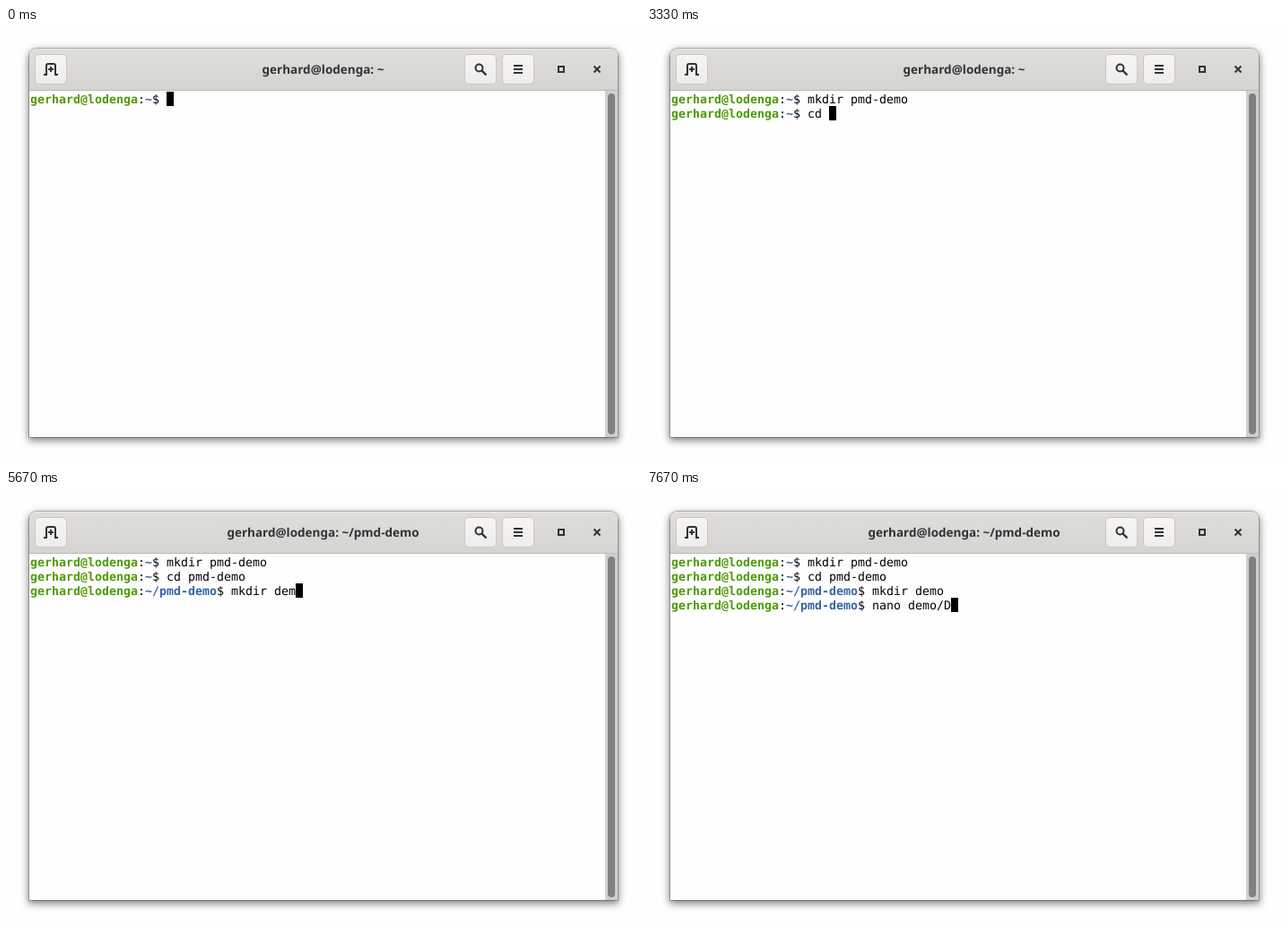
Recreate the animation shown at these times as an HTML page. Size 708x485 px, loop 8000 ms.

```html
<!DOCTYPE html>
<html lang="en">
<head>
<meta charset="utf-8">
<title>Terminal</title>
<style>
  html, body { margin: 0; width: 100%; height: 100%; overflow: hidden; background: #fefefe; }
  #win {
    position: absolute; left: 26px; top: 23px; width: 656px; height: 433px;
    border-radius: 8px 8px 0 0; background: #fefefe;
    box-shadow: 0 0 0 1px rgba(0,0,0,.23), 0 3px 9px 1px rgba(0,0,0,.5);
  }
  svg { position: absolute; left: 0; top: 0; display: block; }
  text { text-rendering: geometricPrecision; white-space: pre; }
  #title { font: bold 13.5px "Noto Sans", sans-serif; fill: #2e3436; text-anchor: middle; }
  #term { font: 13.29px "DejaVu Sans Mono", monospace; }
  .user { fill: #4e9a06; font-weight: bold; }
  .path { fill: #3465a4; font-weight: bold; }
  .btn { fill: url(#btnFill); stroke: #cdc7c2; }
  .icon { fill: none; stroke: #2e3436; stroke-width: 2; }
</style>
</head>
<body>
<div id="win"></div>
<svg width="708" height="485" viewBox="0 0 708 485">
  <defs>
    <linearGradient id="barFill" x2="0" y2="1">
      <stop offset="0" stop-color="#dfdedb"/><stop offset="1" stop-color="#d6d4d0"/>
    </linearGradient>
    <linearGradient id="btnFill" x2="0" y2="1">
      <stop offset="0" stop-color="#f6f5f4"/><stop offset="1" stop-color="#efedeb"/>
    </linearGradient>
  </defs>

  <path d="M26 69V31a8 8 0 0 1 8-8H674a8 8 0 0 1 8 8V69Z" fill="url(#barFill)"/>
  <path d="M33 23.5H675" stroke="#e9e8e6"/>
  <path d="M26 69.5H682" stroke="#bfb9b3"/>
  <text id="title" x="353.5" y="51"></text>

  <rect class="btn" x="32.5" y="29.5" width="35" height="33" rx="4.5"/>
  <rect class="btn" x="511.5" y="29.5" width="35" height="33" rx="4.5"/>
  <rect class="btn" x="553.5" y="29.5" width="35" height="33" rx="4.5"/>
  <g class="icon">
    <path d="M42 52H45V42q0-2 2-2H53q2 0 2 2V52H58"/>
    <path d="M47 46H53M50 43V49"/>
    <circle cx="527.5" cy="44.5" r="4"/>
    <path d="M530.5 47.5L535.5 52.5" stroke-width="2.4"/>
    <path d="M566 42H576M566 46H576M566 50H576"/>
    <rect x="616" y="43" width="6" height="6"/>
    <path d="M655.5 42.5L662.5 49.5M662.5 42.5L655.5 49.5"/>
  </g>

  <rect x="668" y="70" width="14" height="386" fill="#cfcfce"/>
  <rect x="671" y="73" width="8" height="380" rx="4" fill="#7e8182"/>

  <g id="term"></g>
  <rect id="cursor" width="8" height="16"/>
</svg>
<script>
const LOOP = 8000, LEFT = 27, TOP = 71, COL = 8, ROW = 16;
const USER = 'gerhard@lodenga';
const lines = [
  { path: '~', cmd: 'mkdir pmd-demo' },
  { path: '~', cmd: 'cd pmd-demo' },
  { path: '~/pmd-demo', cmd: 'mkdir demo' },
  { path: '~/pmd-demo', cmd: 'nano demo/D' }
];
// [start in ms, active line, typed characters, cursor hidden]
const steps = [
  [0, 0, 0], [330, 0, 0, true], [1000, 0, 0], [1330, 0, 2], [1670, 0, 6],
  [2000, 0, 7], [2330, 0, 10], [2670, 0, 13], [3000, 0, 14],
  [3330, 1, 3], [3670, 1, 7], [4000, 1, 11],
  [4330, 2, 0], [5000, 2, 2], [5330, 2, 6], [5670, 2, 9], [6000, 2, 10],
  [6330, 3, 2], [6670, 3, 5], [7000, 3, 8], [7330, 3, 9], [7670, 3, 11]
];

const byId = id => document.getElementById(id);
const term = byId('term'), title = byId('title'), cursor = byId('cursor');

function addText(parent, col, row, str, cls) {
  const el = document.createElementNS('http://www.w3.org/2000/svg', 'text');
  el.setAttribute('x', LEFT + col * COL);
  el.setAttribute('y', TOP + row * ROW + 13);
  if (cls) el.setAttribute('class', cls);
  el.textContent = str;
  parent.appendChild(el);
  return el;
}

lines.forEach((line, row) => {
  const g = document.createElementNS('http://www.w3.org/2000/svg', 'g');
  const pathCol = USER.length + 1, endCol = pathCol + line.path.length;
  addText(g, 0, row, USER, 'user');
  addText(g, USER.length, row, ':');
  addText(g, pathCol, row, line.path, 'path');
  addText(g, endCol, row, '$');
  line.start = endCol + 2;
  line.input = addText(g, line.start, row, '');
  line.group = g;
  term.appendChild(g);
});

let shown = null;
function render(t) {
  const step = steps.findLast(s => s[0] <= t);
  if (step === shown) return;
  shown = step;
  const [, active, typed, hidden] = step;
  lines.forEach((line, i) => {
    line.group.style.display = i <= active ? '' : 'none';
    line.input.textContent = i < active ? line.cmd : line.cmd.slice(0, typed);
  });
  const line = lines[active];
  title.textContent = `${USER}: ${line.path}`;
  cursor.setAttribute('x', LEFT + (line.start + typed) * COL);
  cursor.setAttribute('y', TOP + active * ROW);
  cursor.style.display = hidden ? 'none' : '';
}

const origin = performance.now();
function tick() {
  render((performance.now() - origin) % LOOP);
  requestAnimationFrame(tick);
}
tick();
</script>
</body>
</html>
```
